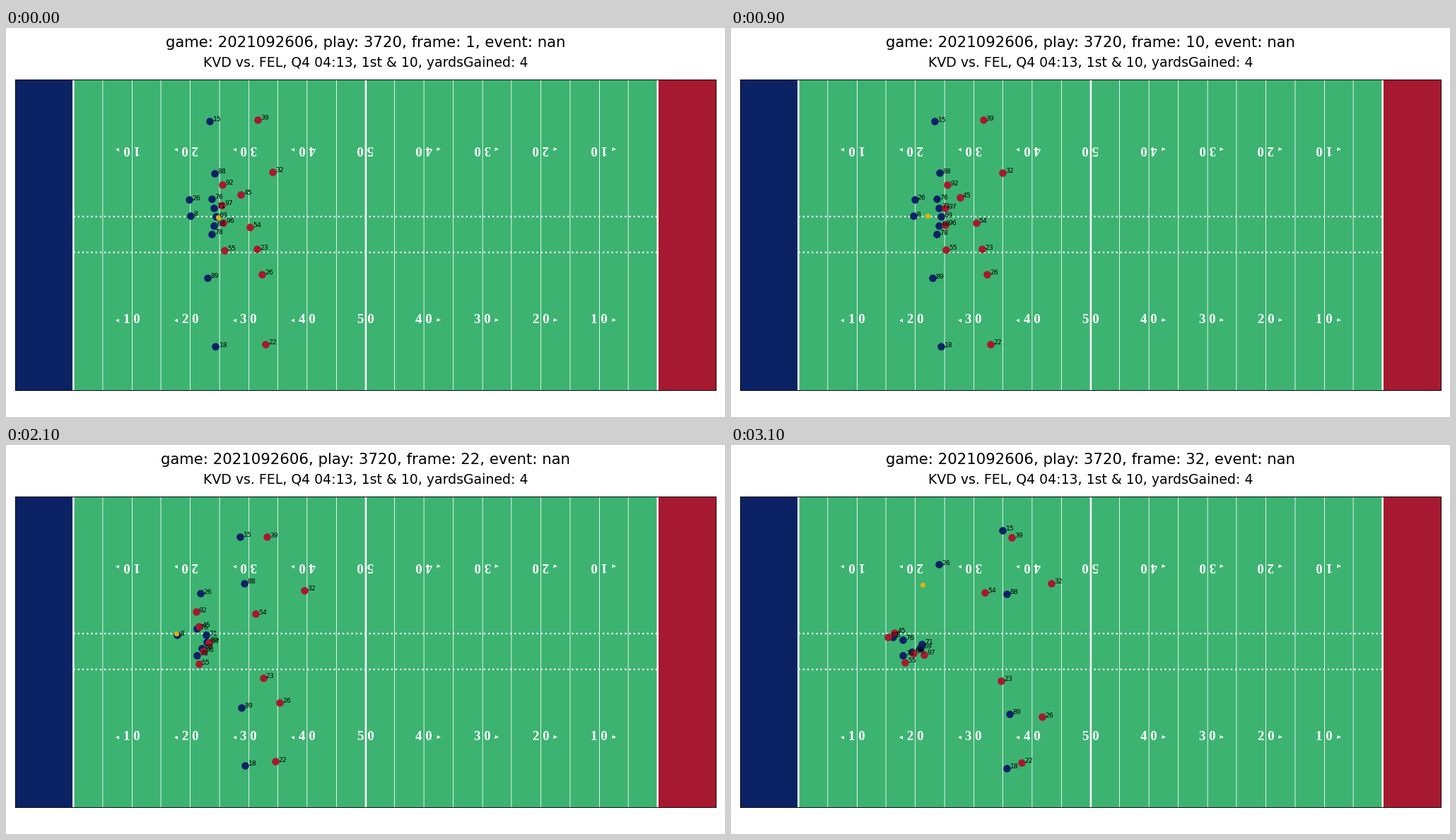
Write a matplotlib script that moves like this. It is 1017 by 551 pixels and loops after 3.2 s.

```python
import numpy as np
import matplotlib.pyplot as plt
from matplotlib.animation import FuncAnimation
from matplotlib.patches import Rectangle

W, H, DPI = 1017, 551, 64
N_FRAMES, INTERVAL = 32, 100
SCALE = 0.8475                        # stage pixels per design pixel (100 dpi)
PT = 100 * SCALE / DPI                # design points in figure points
LEFT, RIGHT, TOP, BOTTOM = 12.71, 1004.29, 72.6, 513.1
YARD = (RIGHT - LEFT) / 120

NAVY, RED, GRASS, GOLD = "#0B2265", "#A71930", "mediumseagreen", "#dbb40c"
SNAP, CATCH, THROW = 6, 14, 27
EVENTS = {SNAP: "ball_snap", THROW: "pass_forward"}

# Pace of a run: time of the first step, time needed to reach full speed
RUSH, ROUTE, COVER = (SNAP, 4), (9, 10), (9, 23)


def px(size):
    return size * 72 / DPI


def field_x(yards):
    return LEFT + YARD * yards


def field_y(yards):
    return BOTTOM - YARD * yards


def progress(now, delay, ramp):
    """Share of a run done: steady acceleration, then constant speed."""
    def distance(time):
        s = max(time - delay, 0)
        return s * s / (2 * ramp) if s < ramp else s - ramp / 2

    return distance(now) / distance(N_FRAMES)


def run(start, end, pace, bend=0):
    """Path from start to end, bowed vertically by bend pixels."""
    start, end = np.array(start, float), np.array(end, float)

    def at(now):
        u = progress(now, *pace)
        return start + (end - start) * u + np.array([0, 4 * bend * u * (1 - u)])

    return at


def block(i):
    """Lineman i backs into the pocket, the tackles furthest."""
    x, y = 297 - 3 * abs(i - 2), 242 + 12.5 * i
    retreat = 48 - 24 * np.sin(np.pi * np.sqrt(i / 4))
    return run((x, y), (x - retreat, y + 34 - 7 * i), ROUTE, 3)


passer = run((261, 266), (229, 271.5), RUSH)

home = [
    ("8", passer),
    ("15", run((288, 132), (384, 120.5), ROUTE, 3)),
    ("88", run((295, 205.5), (390, 210.5), ROUTE, -12)),
    ("89", run((285, 354), (394, 380.5), ROUTE, 6)),
    ("18", run((296.5, 451), (390, 457.5), ROUTE)),
    ("26", run((259.5, 243), (294, 169), ROUTE)),
]
home += [(n, block(i)) for i, n in enumerate("76 71 69 68 78".split())]

away = [
    ("92", run((306, 222), (222, 272), ROUTE, -8)),
    ("45", run((332, 236), (231, 266), RUSH, 4)),
    ("97", run((305.5, 250.5), (273, 296.5), RUSH, 3)),
    ("96", run((307, 275.5), (258.5, 294.5), RUSH, 6)),
    ("55", run((309, 314.5), (246.5, 307.5), RUSH)),
    ("54", run((345.5, 282), (359, 208.5), RUSH)),
    ("32", run((377.5, 203.5), (453.5, 195.5), RUSH, 7)),
    ("39", run((356.5, 130), (397, 130.5), COVER)),
    ("23", run((355, 313), (382, 333.5), COVER, 12)),
    ("26", run((362, 348.5), (440, 385), COVER, 5)),
    ("22", run((367, 447.5), (411, 450), COVER)),
]


def ball_at(now):
    """Resting, snapped to the passer, carried, then thrown straight."""
    spot, target = np.array([300, 268]), np.array([271, 198])
    hand = passer(min(now, THROW)) + np.array([-1.5, -2])
    if now < CATCH:
        return spot + (hand - spot) * max(now - SNAP, 0) / (CATCH - SNAP)
    flight = max(now - THROW, 0) / (N_FRAMES - THROW)
    return hand + (target - hand) * flight


fig = plt.figure(figsize=(W / DPI, H / DPI), dpi=DPI, facecolor="white")
ax = fig.add_axes([0, 0, 1, 1], facecolor=GRASS)
ax.set(xlim=(LEFT, RIGHT), ylim=(BOTTOM, TOP), xticks=[], yticks=[])
for spine in ax.spines.values():
    spine.set_linewidth(0.8 * PT)

heading = fig.text(0.5, 0.98, "", size=18.05 * PT, ha="center", va="top")
subhead = fig.text(0.5, 0, "KVD vs. FEL, Q4 04:13, 1st & 10, yardsGained: 4",
                   size=16 * PT, ha="center", va="baseline")


def place_axes(shift):
    ax.set_position([LEFT / W, 1 - (BOTTOM + shift) / H,
                     (RIGHT - LEFT) / W, (BOTTOM - TOP) / H])
    subhead.set_y(1 - (55 + shift) / H)


def draw_yard_line(yard):
    # Whole design pixels, left unsnapped on the smaller stage
    x = (np.floor(field_x(yard) / SCALE + 0.01) + 0.5) * SCALE
    width = 3 if yard in (10, 60, 110) else 1
    ax.plot([x, x], [TOP, BOTTOM], color="white", lw=px(width * SCALE),
            snap=False, zorder=1.5)


def draw_number(yard, y, angle):
    number = 50 - abs(yard - 60)
    ax.text(field_x(yard), y, " ".join(str(number)), color="white",
            family="Liberation Serif", weight="bold", size=16 * PT,
            rotation=angle, ha="center", va="center", zorder=2)
    side = np.sign(yard - 60)
    if side:
        ax.plot(field_x(yard + 2.5 * side), y, ">" if side > 0 else "<",
                color="white", ms=px(5), mew=0, zorder=2)


def draw_field():
    for start, color in ((0, NAVY), (110, RED)):
        ax.add_patch(Rectangle((field_x(start), TOP), 10 * YARD, BOTTOM - TOP,
                               color=color, lw=0, zorder=1))
    for yard in range(10, 111, 5):
        draw_yard_line(yard)
    for y in (267.1, 317.9):
        ax.plot([field_x(10), field_x(110)], [y, y], ":", color="white",
                lw=2 * PT, snap=False, zorder=1.5)
    for yard in range(20, 101, 10):
        draw_number(yard, field_y(12), 0)
        draw_number(yard, field_y(41.3), 180)


def dots(color, size, z):
    return ax.plot([], [], "o", color=color, ms=px(size), mew=0, zorder=z)[0]


def make_team(players, color, z):
    labels = [ax.text(0, 0, n, size=8 * PT, va="baseline", zorder=6)
              for n, _ in players]
    return [path for _, path in players], labels, dots(color, 10.6, z)


draw_field()
teams = [make_team(home, NAVY, 3), make_team(away, RED, 4)]
ball = dots(GOLD, 7.2, 5)


def update(i):
    now = i + 1
    event = EVENTS.get(now, "nan")
    heading.set_text(f"game: 2021092606, play: 3720, frame: {now}, event: {event}")
    place_axes(0.5 if now in EVENTS else 0)
    for paths, labels, marks in teams:
        points = np.array([path(now) for path in paths])
        marks.set_data(points[:, 0], points[:, 1])
        for label, (x, y) in zip(labels, points):
            label.set_position((x + YARD / 2, y + 0.5))
    x, y = ball_at(now)
    ball.set_data([x], [y])
    return []


anim = FuncAnimation(fig, update, frames=N_FRAMES, interval=INTERVAL,
                     repeat=True, repeat_delay=0, blit=False)
plt.show()
```
